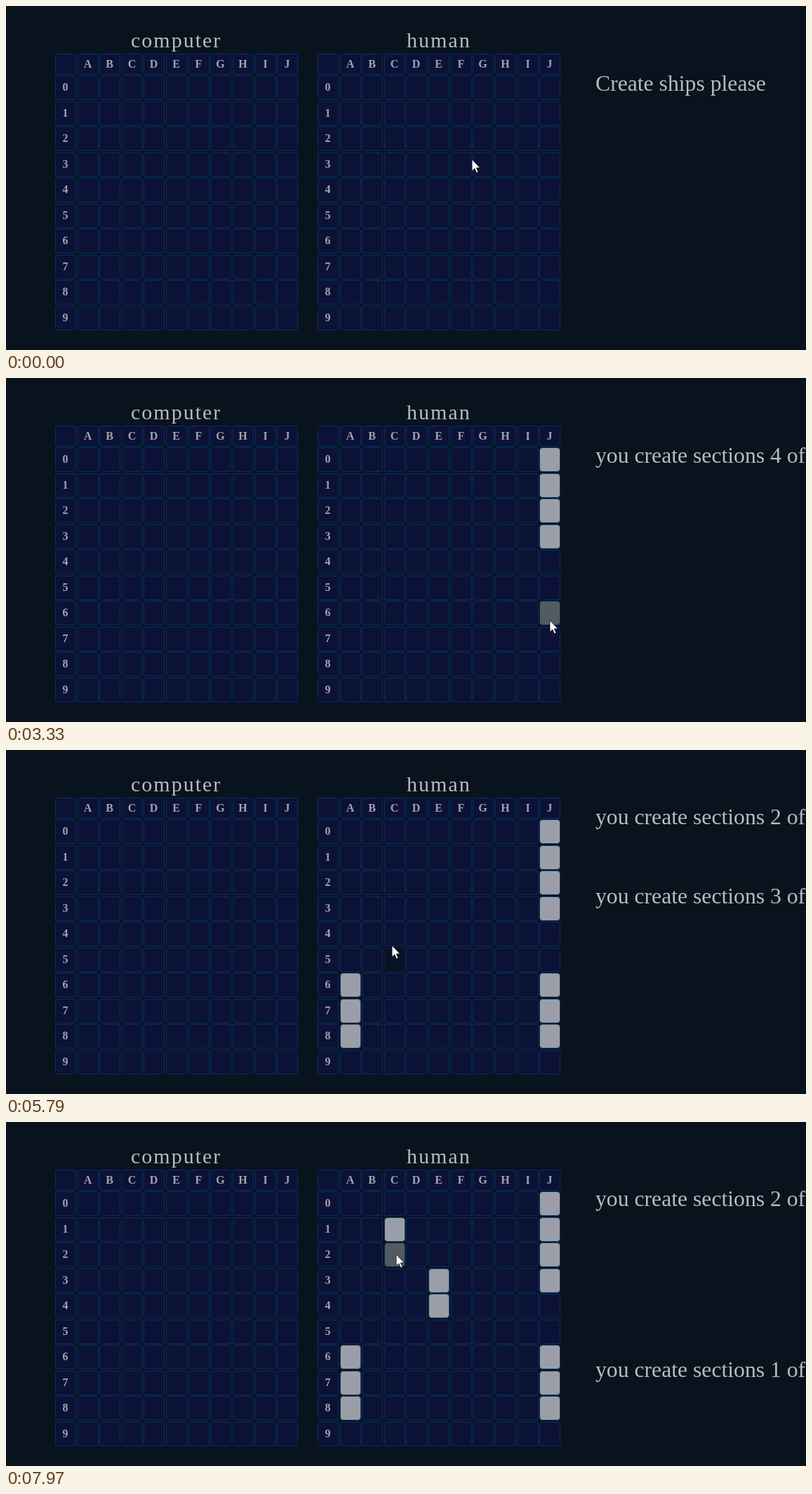
An HTML page that plays this animation: 1140x491 px, repeating every 8000 ms.

```html
<!DOCTYPE html>
<html lang="en">
<head>
<meta charset="utf-8">
<title>Ship placement</title>
<style>
  html, body { margin: 0; width: 100%; height: 100%; overflow: hidden; background: #08131d; }
  svg { display: block; width: 1140px; height: 491px; font-family: "Liberation Serif", "Times New Roman", serif; }
  text { fill: #babbbe; }
  .title { font-size: 30px; letter-spacing: 2px; }
  .label { font-size: 16px; font-weight: bold; text-anchor: middle; fill: #a3a5ac; }
  .message { font-size: 31.7px; }
  .cell { fill: #0c1136; stroke: #033065; }
  .cell.hover { fill: #0a1226; stroke: #08213c; }
  .cell.ship { fill: #9c9ea7; stroke: #0d3d6b; }
  .cell.ship.hover { fill: #545a62; stroke: #0b2b48; }
</style>
</head>
<body>
<svg viewBox="0 0 1140 491">
  <text class="title" x="178" y="59">computer</text>
  <text class="title" x="571" y="59">human</text>
  <g id="boards"></g>
  <text class="message" x="840"></text>
  <text class="message" x="840"></text>
  <path id="cursor" d="M0 0V16.5L3.8 13L6.4 19L9 17.9L6.4 12H11.5Z" fill="#fff" stroke="#0a0a12" stroke-width=".8"/>
</svg>
<script>
const LOOP = 8000, CLICK_GAP = 368, MESSAGE_DELAY = 300, RISE_TIME = 450, HOVER_LAG = 60;
const LEFT = 70, HUMAN_LEFT = 444, TOP = 99.4, COL = 31.62, ROW = 36.5;
const START_Y = 463, REST_Y = 121, LINE = 36;
const LETTERS = 'ABCDEFGHIJ';

const cellX = (left, c) => Math.round(left + COL * (c + 1));
const cellY = r => r < 0 ? 68 : Math.round(TOP + ROW * r);

// Each ship is clicked cell by cell; aim is the pointer's place inside the cell.
const ships = [
  { col: 'J', row: 0, size: 4, dir: 1, at: 957, aim: 19 },
  { col: 'J', row: 6, size: 3, dir: 1, at: 3177, aim: 15 },
  { col: 'A', row: 8, size: 3, dir: -1, at: 4520, aim: 12 },
  { col: 'E', row: 3, size: 2, dir: 1, at: 6254, aim: 7 },
  { col: 'C', row: 1, size: 2, dir: 1, at: 7599, aim: 17 }
];
const clicks = ships.flatMap(s => Array.from({ length: s.size }, (_, i) => {
  const row = s.row + s.dir * i;
  return {
    id: s.col + row, at: s.at + i * CLICK_GAP, section: i + 1,
    x: cellX(HUMAN_LEFT, LETTERS.indexOf(s.col)) + s.aim, y: cellY(row) + 17
  };
}));
const messages = [
  { at: -RISE_TIME, text: 'Create ships please' },
  ...clicks.map(c => ({ at: c.at + MESSAGE_DELAY, text: `you create sections ${c.section} of` }))
];
const stops = [
  { at: 0, x: 664, y: 219 }, { at: 1280, x: 779, y: 163 },
  { at: 2490, x: 789, y: 353 }, { at: 3990, x: 753, y: 414 }, ...clicks
].sort((a, b) => a.at - b.at);

// The picture refreshes in even steps of about 137 ms between these times.
const marks = [0, 1280, 2490, 3990, 4910, 6620, 7970];

function snap(t) {
  const i = marks.findLastIndex(m => m <= t), start = marks[i];
  if (i === marks.length - 1) return start;
  const span = marks[i + 1] - start, size = span / Math.round(span / 137);
  return start + Math.floor((t - start) / size + 0.01) * size;
}

function pointer(t) {
  const i = stops.findLastIndex(s => s.at <= t), a = stops[i], b = stops[i + 1] || a;
  const k = b === a ? 0 : (t - a.at) / (b.at - a.at), ease = k * k * (3 - 2 * k);
  return [a.x + (b.x - a.x) * ease, a.y + (b.y - a.y) * ease];
}

function cellAt([x, y]) {
  const c = (x - HUMAN_LEFT) / COL, r = (y - TOP) / ROW;
  const inGap = c % 1 > .95;
  return inGap ? '' : LETTERS[Math.floor(c) - 1] + Math.floor(r);
}

const boards = document.getElementById('boards');
const cursor = document.getElementById('cursor');
const [newLine, oldLine] = document.querySelectorAll('.message');
const cells = {};

function add(name, attrs, text = '') {
  const el = document.createElementNS('http://www.w3.org/2000/svg', name);
  for (const key in attrs) el.setAttribute(key, attrs[key]);
  el.textContent = text;
  return boards.appendChild(el);
}

function drawBoard(left, store = {}) {
  for (let r = -1; r < 10; r++) {
    for (let c = -1; c < 10; c++) {
      const x = cellX(left, c), y = cellY(r), height = r < 0 ? 29 : 34;
      const rect = add('rect', { class: 'cell', x: x + .5, y: y + .5, width: 29, height, rx: 2 });
      if (r >= 0 && c >= 0) store[LETTERS[c] + r] = rect;
      else if (r >= 0) add('text', { class: 'label', x: x + 14.5, y: y + 22 }, r);
      else if (c >= 0) add('text', { class: 'label', x: x + 14.5, y: 88 }, LETTERS[c]);
    }
  }
}

function show(line, message, y) {
  line.textContent = message.text;
  line.setAttribute('y', Math.round(y));
}

// share of the way up, slowing towards the top
function risen(message, t) {
  const left = 1 - Math.min(1, (t - message.at) / RISE_TIME);
  return 1 - left * left;
}

const messageY = share => START_Y + (REST_Y - START_Y) * share;

function draw(t) {
  const hovered = cellAt(pointer(Math.max(0, t - HOVER_LAG)));
  const placed = clicks.filter(c => c.at <= t).map(c => c.id);
  for (const id in cells) {
    const ship = placed.includes(id);
    cells[id].setAttribute('class', 'cell' + (ship ? ' ship' : '') + (id === hovered ? ' hover' : ''));
    cells[id].setAttribute('rx', ship ? 4 : 2);
  }

  const last = messages.findLastIndex(m => m.at <= t), share = risen(messages[last], t);
  show(newLine, messages[last], messageY(share));
  const old = share < 1 && messages[last - 1];
  if (old) show(oldLine, old, messageY(risen(old, t)) - LINE * share ** 2.6);
  else oldLine.textContent = '';

  cursor.setAttribute('transform', `translate(${pointer(t).map(Math.round)})`);
}

drawBoard(LEFT);
drawBoard(HUMAN_LEFT, cells);
const began = performance.now();
function tick() {
  draw(snap((performance.now() - began) % LOOP));
  requestAnimationFrame(tick);
}
tick();
</script>
</body>
</html>
```
